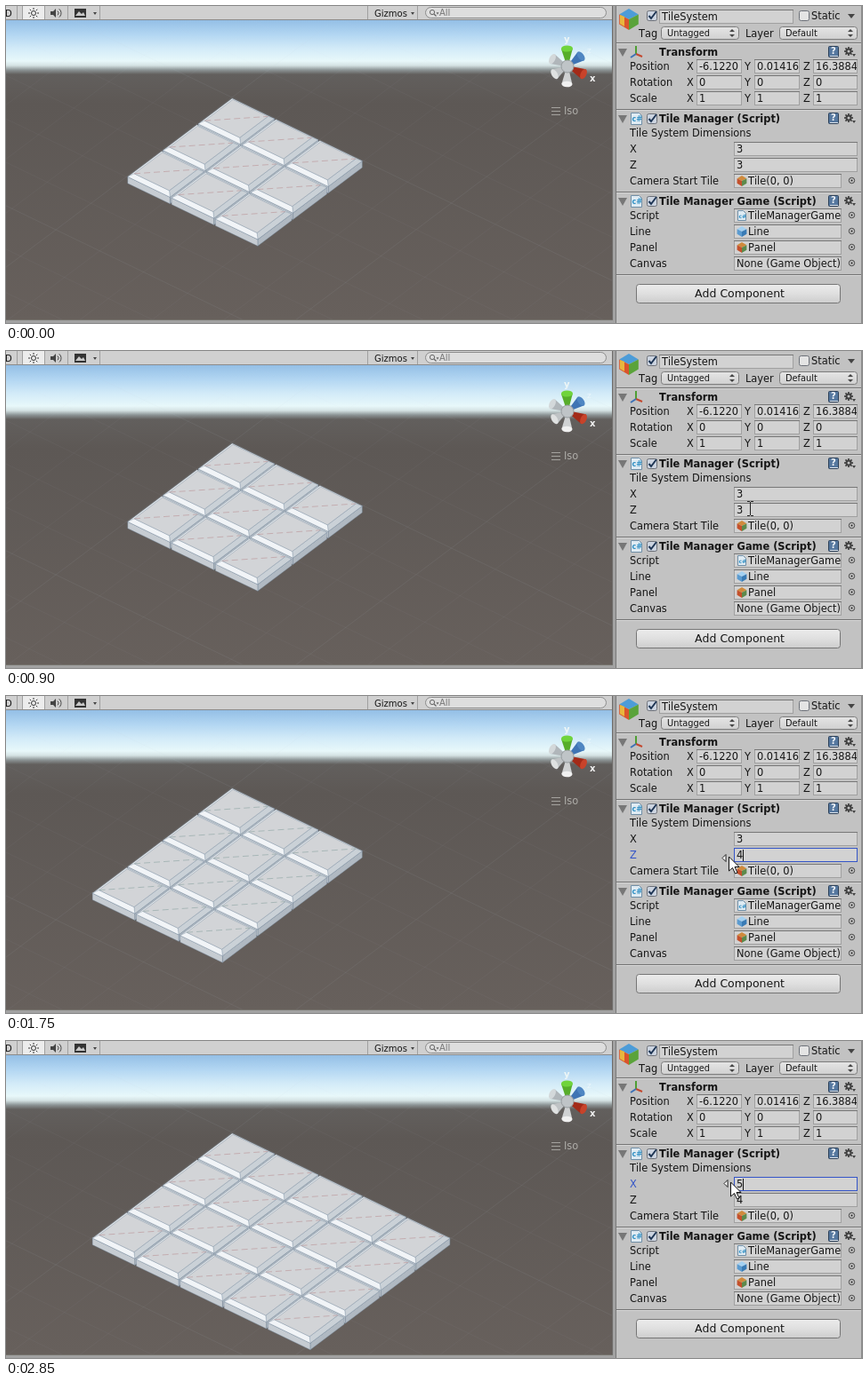
Animation, 962 px wide and 357 px high, one loop 3.05 s. Source, as an HTML page with a canvas:

```html
<!DOCTYPE html>
<html lang="en">
<head>
<meta charset="utf-8">
<title>Tile system editor</title>
<style>
html, body { margin: 0; width: 100%; height: 100%; overflow: hidden; background: #a2a2a2; }
canvas { display: block; }
</style>
</head>
<body>
<canvas id="stage" width="962" height="357"></canvas>
<script>
const g = document.getElementById('stage').getContext('2d');
const LOOP = 3050, STEP = 50;
const INK = '#161616', BLUE = '#3455c8';
g.fontKerning = 'none';

function box(x, y, w, h, fill) {
  g.fillStyle = fill;
  g.fillRect(x, y, w, h);
}

function frame(x, y, w, h, color) {
  g.strokeStyle = color;
  g.lineWidth = 1;
  g.strokeRect(x + .5, y + .5, w - 1, h - 1);
}

function shade(y, h, ...colors) {
  const c = g.createLinearGradient(0, y, 0, y + h);
  colors.forEach((col, k) => c.addColorStop(k / (colors.length - 1), col));
  return c;
}

function rounded(x, y, w, h, r, fill, stroke) {
  g.beginPath();
  g.roundRect(x + .5, y + .5, w - 1, h - 1, r);
  g.fillStyle = fill;
  g.fill();
  g.strokeStyle = stroke;
  g.lineWidth = 1;
  g.stroke();
}

function poly(pts, fill, stroke, width = 1) {
  g.beginPath();
  pts.forEach(([x, y]) => g.lineTo(x, y));
  g.closePath();
  if (fill) { g.fillStyle = fill; g.fill(); }
  if (stroke) { g.strokeStyle = stroke; g.lineWidth = width; g.stroke(); }
}

function line(x1, y1, x2, y2, color, width = 1) {
  g.beginPath();
  g.moveTo(x1, y1);
  g.lineTo(x2, y2);
  g.strokeStyle = color;
  g.lineWidth = width;
  g.stroke();
}

function disc(x, y, r, fill, stroke) {
  g.beginPath();
  g.arc(x, y, r, 0, 7);
  if (fill) { g.fillStyle = fill; g.fill(); }
  if (stroke) { g.strokeStyle = stroke; g.lineWidth = 1; g.stroke(); }
}

function text(s, x, mid, { size = 11.4, bold = false, color = INK } = {}) {
  g.font = `${bold ? 'bold ' : ''}${size}px "DejaVu Sans", sans-serif`;
  g.fillStyle = color;
  g.fillText(s, x, mid + 4);
}

const down = (x, y, s, color = '#444') => poly([[x - s, y - s / 2], [x + s, y - s / 2], [x, y + s / 2 + 1]], color);

// ---------- scene ----------
function clipScene() {
  g.beginPath();
  g.rect(0, 16, 682, 337);
  g.clip();
}

function sky() {
  const c = g.createLinearGradient(0, 16, 0, 353);
  [[16, '#94bfe6'], [32, '#b2d6f2'], [48, '#d3ebf8'], [62, '#e8f8fa'], [67, '#d4e2e3'],
   [72, '#8c9495'], [77, '#625f5d'], [110, '#5d5855'], [353, '#67605c']]
    .forEach(([y, col]) => c.addColorStop((y - 16) / 337, col));
  box(0, 16, 682, 337, c);
}

const U = [49.3, 23.8], V = [-39.6, 29.8];
const at = (u, v, h = 0) => [254 + u * U[0] + v * V[0], 103 + u * U[1] + v * V[1] - h];

function grid() {
  for (let k = -20; k <= 20; k++) {
    const color = `rgba(190,200,210,${k % 5 ? .04 : .08})`;
    line(...at(k, -30), ...at(k, 30), color);
    line(...at(-30, k), ...at(30, k), color);
  }
}

function tile(i, j, dash) {
  const quad = (pad, h) => [[pad, pad], [1 - pad, pad], [1 - pad, 1 - pad], [pad, 1 - pad]]
    .map(([u, v]) => at(i + u, j + v, h));
  const rim = quad(.018, 0), top = quad(.1, 3), foot = quad(.018, -7.5);
  const edge = 'rgba(112,132,154,.55)';
  poly([rim[1], rim[2], foot[2], foot[1]], '#b0b9c2', edge, .7);
  poly([rim[3], rim[2], foot[2], foot[3]], '#c6ccd2', edge, .7);
  poly(rim, '#e4e8eb', edge, .7);
  poly([top[1], top[2], rim[2], rim[1]], '#cad1d7', edge, .6);
  poly([top[3], top[2], rim[2], rim[3]], '#f1f4f7', edge, .6);
  poly(top, '#d2d4d7', edge, .7);
  g.setLineDash([7, 4]);
  line(...top[3], ...top[1], dash, .9);
  g.setLineDash([]);
}

function cone(angle, len, half, color, cap) {
  g.save();
  g.translate(631, 68);
  g.rotate(angle);
  poly([[5, -2], [len, -half], [len, half], [5, 2]], color);
  g.beginPath();
  g.ellipse(len, 0, half * .55, half, 0, 0, 7);
  g.fillStyle = cap;
  g.fill();
  g.restore();
}

function gizmo() {
  cone(-.65, 19, 6, '#3f74b4', '#4f86c2');
  cone(-2.68, 19, 6, '#b0b6ba', '#d3d8da');
  cone(-1.6, 20, 6.5, '#56ad2b', '#70d43c');
  cone(2.6, 17, 6, '#bfc3c5', '#dfe1e1');
  cone(1.6, 20, 6, '#cfd1d2', '#f0f0f0');
  cone(.45, 20, 6, '#a32a18', '#c8432a');
  disc(631, 68, 7, '#bfc4c7', '#979c9f');
  text('y', 627, 37, { size: 10, bold: true, color: '#eef6f6' });
  text('x', 656, 81, { size: 10, bold: true, color: '#f2f2f2' });
  text('z', 653, 49, { size: 9, color: 'rgba(255,255,255,.5)' });
  for (let y = 114; y < 124; y += 4) box(613, y, 10, 1, '#a5a39f');
  text('Iso', 627, 118, { color: '#aeaca8' });
}

function scene(s) {
  g.save();
  clipScene();
  sky();
  grid();
  for (let i = 0; i < s.x; i++) for (let j = 0; j < s.z; j++) tile(i, j, s.dash);
  gizmo();
  g.restore();
  box(681, 0, 1, 354, '#6d6b69');
  box(0, 353, 682, 1, '#77756f');
}

function toolbar() {
  box(0, 0, 682, 16, '#d0d0d0');
  box(0, 15, 682, 1, '#8b8b8b');
  text('D', -1, 8, { size: 10 });
  box(19, 0, 24, 15, '#ececec');
  [12, 18, 43, 69, 105, 406, 462].forEach(x => box(x, 0, 1, 15, '#a0a0a0'));
  disc(31, 8, 2.5, null, '#333');
  for (let k = 0; k < 8; k++) {
    const c = Math.cos(k * Math.PI / 4), s = Math.sin(k * Math.PI / 4);
    line(31 + 4 * c, 8 + 4 * s, 31 + 6 * c, 8 + 6 * s, '#333');
  }
  poly([[50, 6], [53, 6], [56, 3], [56, 13], [53, 10], [50, 10]], '#444');
  [3, 6].forEach(r => {
    g.beginPath();
    g.arc(56, 8, r, -.9, .9);
    g.strokeStyle = '#444';
    g.stroke();
  });
  box(77, 3, 13, 10, '#333');
  poly([[78, 11], [82, 6], [85, 9], [87, 7], [89, 11]], '#c8c8c8');
  down(100, 8, 2);
  text('Gizmos', 414, 8, { size: 10 });
  down(457, 8, 2);
  rounded(471, 1, 204, 13, 6.5, '#dedede', '#8c8c8c');
  disc(479, 7, 2.6, null, '#666');
  line(481, 9, 483.5, 11.5, '#666', 1.3);
  down(485, 8, 1.5, '#666');
  text('All', 487, 7, { size: 10, color: '#777' });
}

// ---------- inspector ----------
function cube(cx, cy, r, front, side = front, top = side) {
  const a = r * .9, b = r * .45;
  poly([[cx, cy - r], [cx + a, cy - b], [cx, cy], [cx - a, cy - b]], top);
  poly([[cx - a, cy - b], [cx, cy], [cx, cy + r], [cx - a, cy + b]], front);
  poly([[cx + a, cy - b], [cx, cy], [cx, cy + r], [cx + a, cy + b]], side);
}
const colorCube = (x, y, r) => cube(x, y, r, '#c4512c', '#5d8a4c', '#d08a3c');
const blueCube = (x, y, r) => cube(x, y, r, '#5b9bd0', '#397bb5', '#a4d1f1');

function check(x, y, on) {
  rounded(x, y, 12, 12, 2, on ? '#ccd4e0' : '#e4e4e4', '#6c7078');
  if (!on) return;
  g.beginPath();
  g.moveTo(x + 2.5, y + 6);
  g.lineTo(x + 5, y + 9);
  g.lineTo(x + 11, y + 1);
  g.strokeStyle = '#1e3554';
  g.lineWidth = 2;
  g.stroke();
}

function field(x, mid, w, value, focus) {
  const y = mid - 8;
  box(x, y, w, 16, '#d2d2d2');
  frame(x, y, w, 16, '#a0a0a0');
  box(x, y, w, 1, '#777');
  if (focus) frame(x, y, w, 16, BLUE);
  g.save();
  g.beginPath();
  g.rect(x, y, w - 1, 16);
  g.clip();
  text(value, x + 3, mid);
  g.restore();
}

function popup(x, label) {
  rounded(x, 23, 88, 15, 3, shade(23, 15, '#e6e6e6', '#cfcfcf'), '#7c7c7c');
  text(label, x + 7, 30, { size: 9.8 });
  poly([[x + 77, 29], [x + 83, 29], [x + 80, 26]], '#444');
  poly([[x + 77, 32], [x + 83, 32], [x + 80, 35]], '#444');
}

function gear(x, y) {
  for (let k = 0; k < 4; k++) {
    const c = 5 * Math.cos(k * Math.PI / 4), s = 5 * Math.sin(k * Math.PI / 4);
    line(x - c, y - s, x + c, y + s, '#404040', 1.7);
  }
  disc(x, y, 3.5, '#404040');
  disc(x, y, 1.5, '#c2c2c2');
  down(x + 6, y + 4, 2);
}

function page(x, y, w, h, size) {
  poly([[x, y], [x + w - 3, y], [x + w, y + 3], [x + w, y + h], [x, y + h]], '#dfebf3', '#6f8ea6');
  text('c#', x + 1, y + h / 2 - 1, { size, bold: true, color: '#2f8fc4' });
}

function header(mid, title, script) {
  box(686, mid - 11, 275, 1, '#747474');
  box(686, mid - 10, 275, 1, '#d6d6d6');
  poly([[688, mid - 4], [698, mid - 4], [693, mid + 5]], '#777');
  if (script) {
    page(702.5, mid - 6.5, 12, 13, 8);
    check(720, mid - 6, true);
  }
  text(title, 734, mid, { bold: true });
  rounded(924, mid - 7, 12, 13, 1, '#56789f', '#2b3f58');
  box(926, mid + 4, 9, 1, '#dfe6ee');
  text('?', 927, mid - 2, { size: 10, bold: true, color: '#f2f5f9' });
  gear(947, mid - 1);
}

function objectField(mid, label, value, icon) {
  text(label, 701, mid);
  field(818, mid, 121, icon ? '' : value);
  if (icon) {
    icon(827, mid, 6);
    g.save();
    g.beginPath();
    g.rect(818, mid - 8, 120, 16);
    g.clip();
    text(value, 834, mid);
    g.restore();
  }
  disc(950.5, mid - .5, 3.2, null, '#444');
  disc(950.5, mid - .5, 1, '#222');
}

function numberField(mid, name, value, s) {
  const focus = s.focus === name;
  text(name, 701, mid, { color: focus ? BLUE : INK });
  field(818, mid, 139, '', focus);
  if (focus && s.selected) box(821, mid - 7, 8, 14, '#7293c8');
  text(String(value), 821, mid);
  if (focus && !s.selected) box(828, mid - 6, 1, 13, '#111');
}

function inspector(s) {
  box(685, 0, 277, 357, '#c2c2c2');
  box(685, 0, 1, 357, '#777');
  box(961, 0, 1, 357, '#8c8c8c');

  cube(700, 15, 12, '#d9542c', '#5aa33a', '#4c9cd8');
  poly([[690, 10], [695, 12], [695, 23], [690, 20]], '#e8b73d');
  check(720, 5, true);
  field(734, 12, 151, 'TileSystem');
  check(891, 5, false);
  text('Static', 905, 11);
  down(950, 11, 4);
  text('Tag', 711, 31);
  popup(736, 'Untagged');
  text('Layer', 831, 31);
  popup(869, 'Default');

  header(52, 'Transform');
  line(708, 54, 708, 45, '#4e9e33', 2);
  line(708, 54, 715, 57, '#c4472d', 2);
  line(708, 54, 702, 58, '#3e72b6', 2);
  [['Position', '-6.1220', '0.01416', '16.3884'], ['Rotation', 0, 0, 0], ['Scale', 1, 1, 1]]
    .forEach(([label, ...v], row) => {
      const mid = 68 + row * 18;
      text(label, 701, mid);
      [[765, 776, 51], [830, 841, 51], [896, 907, 50]].forEach(([lx, fx, w], k) => {
        text('XYZ'[k], lx, mid);
        field(fx, mid, w, String(v[k]));
      });
    });

  header(127, 'Tile Manager (Script)', true);
  text('Tile System Dimensions', 701, 143);
  numberField(161, 'X', s.x, s);
  numberField(179, 'Z', s.z, s);
  objectField(197, 'Camera Start Tile', 'Tile(0, 0)', colorCube);

  header(220, 'Tile Manager Game (Script)', true);
  objectField(236, 'Script', 'TileManagerGame', (x, y) => page(x - 4.5, y - 5.5, 9, 11, 6));
  objectField(254, 'Line', 'Line', blueCube);
  objectField(272, 'Panel', 'Panel', colorCube);
  objectField(290, 'Canvas', 'None (Game Object)');
  box(686, 302, 275, 1, '#747474');
  box(686, 303, 275, 1, '#d6d6d6');
  rounded(708, 313, 230, 22, 3, shade(313, 22, '#ececec', '#dfdfdf', '#cccccc'), '#757575');
  text('Add Component', 774, 324, { size: 12.5 });
}

// ---------- pointer ----------
const PATH = [[250, 905, 365], [600, 848, 163], [750, 848, 163], [950, 834, 180], [1150, 826, 181],
  [1450, 812, 181], [1750, 812, 181], [1950, 848, 152], [2050, 848, 152], [2250, 844, 162],
  [2600, 844, 162], [2750, 814, 159], [LOOP, 814, 159]];

function pointerAt(t) {
  const n = PATH.findIndex(p => p[0] > t);
  if (n < 1) return null;
  const [t0, x0, y0] = PATH[n - 1], [t1, x1, y1] = PATH[n];
  const k = (t - t0) / (t1 - t0), e = k * k * (3 - 2 * k);
  return [x0 + (x1 - x0) * e, y0 + (y1 - y0) * e];
}

function pointer(t) {
  const p = pointerAt(t);
  if (!p) return;
  const x = Math.round(p[0]), y = Math.round(p[1]);
  if (t >= 550 && t < 1050) {
    box(x, y - 7, 1, 15, '#222');
    [-8, 8].forEach(d => { box(x - 3, y + d, 3, 1, '#222'); box(x + 1, y + d, 3, 1, '#222'); });
    return;
  }
  if (x < 818) poly([[x - 7, y + 1.5], [x - 3, y - 2.5], [x - 3, y + 5.5]], '#fff', '#222');
  const arrow = [[0, 0], [0, 16], [4, 12.5], [7, 19], [9.5, 18], [6.5, 11.5], [11.5, 11.5]];
  poly(arrow.map(([dx, dy]) => [x + dx + .5, y + dy]), '#fff', '#111');
}

// ---------- timeline ----------
function stateAt(t) {
  return {
    x: t < 2800 ? 3 : 5,
    z: t < 1750 ? 3 : 4,
    focus: t < 1000 ? '' : t < 2250 ? 'Z' : 'X',
    selected: (t >= 1100 && t < 1750) || (t >= 2700 && t < 2800),
    dash: t >= 1150 && t < 2250 ? '#a3b4b4' : '#c2a9ac'
  };
}

function draw(t) {
  const s = stateAt(t);
  box(0, 0, 962, 357, '#a2a2a2');
  toolbar();
  scene(s);
  inspector(s);
  pointer(t);
}

const start = performance.now();
function tick() {
  const t = (performance.now() - start) % LOOP;
  draw(Math.min(2850, Math.floor(t / STEP) * STEP));
  requestAnimationFrame(tick);
}
tick();
</script>
</body>
</html>
```
